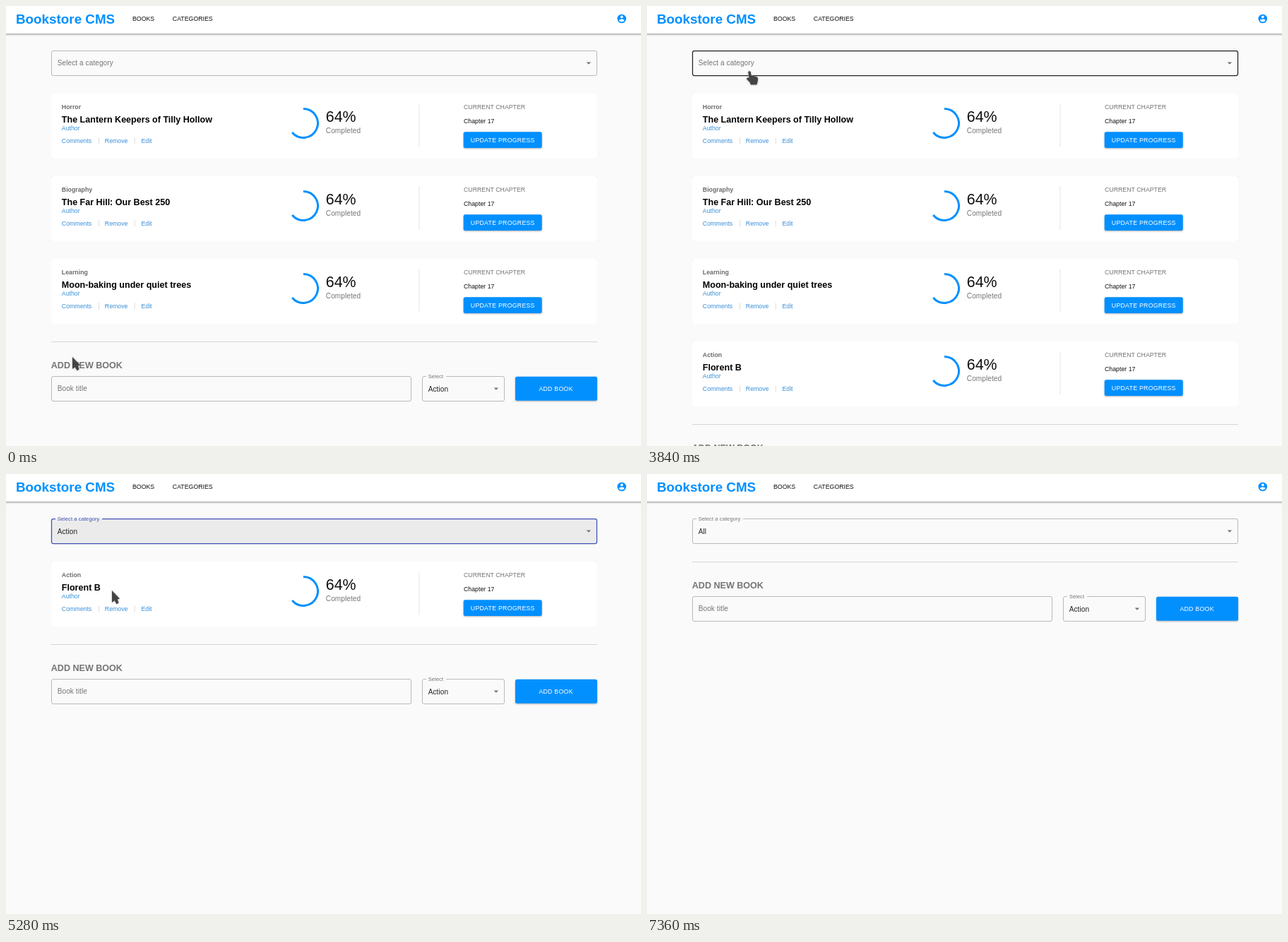
Recreate the animation shown at these times as an HTML page. Size 899 by 623 pixels, loop 7600 ms.

```html
<!DOCTYPE html>
<html lang="en">
<head>
<meta charset="utf-8">
<title>Bookstore</title>
<style>
html, body { margin: 0; width: 100%; height: 100%; overflow: hidden; background: #fafafa; }
svg { display: block; width: 899px; height: 623px; font-family: "Liberation Sans", Arial, sans-serif; }
.bar { filter: drop-shadow(0 1.2px 1.5px rgba(0,0,0,.45)); }
.card { filter: drop-shadow(0 .9px .7px rgba(0,0,0,.42)); }
.btn { filter: drop-shadow(0 1px .8px rgba(0,0,0,.3)); }
.menu { filter: drop-shadow(0 2px 2.5px rgba(0,0,0,.45)); }
.cur { filter: drop-shadow(0 .8px .8px rgba(0,0,0,.3)); }
</style>
</head>
<body>
<svg id="stage" viewBox="0 0 899 623" xmlns="http://www.w3.org/2000/svg"></svg>
<script>
const LOOP = 7600, STEP = 40;
const BLUE = '#0290ff', FOCUS = '#3f51b5', GREY = '#757575', INK = '#212121', LINK = '#3a8fd9';
const BODY = 10.05, SMALL = 8.79, TINY = 7.54, TITLE = 12.56;
const LEFT = 64.5, WIDTH = 772, TOP = 124, PITCH = 117, ROW = 22.6;

const BOOKS = [
  ['Horror', 'The Lantern Keepers of Tilly Hollow'],
  ['Biography', 'The Far Hill: Our Best 250'],
  ['Learning', 'Moon-baking under quiet trees'],
  ['Action', 'Florent B']
];
const CATEGORIES = ['All', 'Action', 'Biography', 'History', 'Horror', 'Kids', 'Learning', 'Sci-Fi'];
const KEY_TIMES = [520, 840, 880, 1080, 1080, 1240, 1320, 1400, 1600];

// time from which each list of books is shown
const LISTS = [
  [0, [0, 1, 2]], [2240, [0, 1, 2, 3]], [4840, [3]], [6080, [0, 1, 2, 3]],
  [6680, [1, 2, 3]], [6960, [2, 3]], [7080, [3]], [7320, []]
];
const MENUS = [
  { y: 65, open: 4060, shut: 4860, picked: -1, pressed: 1, press: 4640 },
  { y: 42.4, open: 5600, shut: 6080, picked: 1, pressed: 0, press: 5980 }
];
// time, x, y, pointer kind from then on
const POINTER = [
  [0, 94, 497, 'arrow'], [120, 150, 540, 'beam'], [200, 150, 540, 'beam'], [360, 608, 567, 'arrow'],
  [1800, 608, 567, 'arrow'], [1960, 735, 545, 'hand'], [2120, 780, 532, 'hand'], [2240, 780, 532, 'arrow'],
  [2440, 780, 532, 'arrow'], [2640, 722, 560, 'arrow'], [2880, 722, 560, 'arrow'], [3160, 420, 380, 'arrow'],
  [3320, 200, 140, 'arrow'], [3480, 164, 189, 'arrow'], [3640, 164, 189, 'arrow'], [3760, 149, 98, 'hand'],
  [3840, 145, 92, 'hand'], [4240, 145, 92, 'hand'], [4600, 108.5, 103, 'hand'], [4880, 108.5, 103, 'hand'],
  [5000, 116, 116, 'arrow'], [5160, 150, 165, 'arrow'], [5320, 150, 165, 'arrow'], [5480, 118, 92, 'hand'],
  [5640, 116.5, 92, 'hand'], [5760, 116.5, 107, 'hand'], [5920, 104, 60, 'hand'], [6080, 104, 60, 'arrow'],
  [6280, 152, 182, 'arrow'], [6440, 152, 182, 'arrow'], [6480, 162, 183, 'hand'], [7280, 162, 183, 'hand'],
  [7320, 190, 2, 'arrow'], [7360, 190, -40, 'arrow']
];

const clamp = v => Math.max(0, Math.min(1, v));
const ramp = (t, from, span) => { const p = clamp((t - from) / span); return p * p * (3 - 2 * p); };
const mix = (a, b, p) => a + (b - a) * p;

const text = (x, y, s, size, fill, extra = '') =>
  `<text x="${x}" y="${y}" font-size="${size}" fill="${fill}" ${extra}>${s}</text>`;
const body = (x, y, s, fill) => text(x, y, s, BODY, fill, 'letter-spacing=".094"');
const bold = (x, y, s, size, fill) => text(x, y, s, size, fill, 'font-weight="700"');
const rect = (x, y, w, h, fill, extra = '') =>
  `<rect x="${x}" y="${y}" width="${w}" height="${h}" fill="${fill}" ${extra}/>`;

function button(x, y, w, h, label, tx, ty) {
  return rect(x, y, w, h, BLUE, 'rx="2.5" class="btn"') +
    text(tx, ty, label, SMALL, '#fff', 'letter-spacing=".25"');
}

// rounded outline with a gap for the raised label
function outline(x, y, w, h, gap, color, weight, fill = 'none') {
  const r = 2.5, d = `M${x + 5.5 + gap} ${y}H${x + w - r}a${r} ${r} 0 0 1 ${r} ${r}V${y + h - r}` +
    `a${r} ${r} 0 0 1 ${-r} ${r}H${x + r}a${r} ${r} 0 0 1 ${-r} ${-r}V${y + r}a${r} ${r} 0 0 1 ${r} ${-r}H${x + 5.5}`;
  return (fill === 'none' ? '' : rect(x, y, w, h, fill, `rx="${r}"`)) +
    `<path d="${d}" fill="none" stroke="${color}" stroke-width="${weight}"/>`;
}

function field(o) {
  const p = o.raised, color = o.focus ? FOCUS : o.hover ? INK : '#b9b9b9';
  return outline(o.x, o.y, o.w, 35, o.gap * p, color, o.focus || o.hover ? 1.25 : 1, o.fill) +
    text(o.x + 8.2, mix(o.y + 20.7, o.y + 2.7, p), o.label, mix(BODY, TINY, p),
      o.focus ? FOCUS : GREY, 'letter-spacing=".09"') +
    (o.value ? body(o.x + 8.2, o.y + 21.3, o.value, INK) : '') +
    (o.arrow ? `<path d="M${o.x + o.w - 14.8} ${o.y + 16}h6.4l-3.2 3.3z" fill="${GREY}"/>` : '');
}

function header() {
  return rect(-5, -5, 909, 44, '#fff', 'class="bar"') +
    bold(14, 24.6, 'Bookstore CMS', 18.84, BLUE) +
    text(179, 21, 'BOOKS', SMALL, '#111') + text(235.8, 21, 'CATEGORIES', SMALL, '#111') +
    `<path transform="translate(864.2 10.4) scale(.628)" fill="${BLUE}" d="M12 2a10 10 0 1 0 0 20a10 10 0 1 0 0-20z` +
    `m0 3a3 3 0 1 1 0 6a3 3 0 1 1 0-6zm0 14.2c-2.5 0-4.7-1.3-6-3.2c0-2 4-3.1 6-3.1s6 1.1 6 3.1c-1.3 1.9-3.5 3.2-6 3.2z" fill-rule="evenodd"/>`;
}

function card([kind, title], i) {
  const a = 0.64 * 2 * Math.PI, r = 20.5;
  return `<g transform="translate(0 ${i * PITCH})">` +
    rect(64, 124, 773, 92, '#fff', 'rx="1.5" class="card"') +
    bold(78.8, 146.2, kind, SMALL, '#6b6b6b') +
    bold(78.8, 165, title, TITLE, '#000') +
    text(78.8, 175.6, 'Author', SMALL, LINK) +
    text(78.8, 194.3, 'Comments', SMALL, LINK) +
    text(139.8, 194.3, 'Remove', SMALL, LINK) +
    text(191.4, 194.3, 'Edit', SMALL, LINK) +
    rect(131, 186.5, 1, 9, '#dcdcdc') + rect(181.7, 186.5, 1, 9, '#dcdcdc') +
    `<path d="M421 ${166 - r}A${r} ${r} 0 1 1 ${421 + r * Math.sin(a)} ${166 - r * Math.cos(a)}" fill="none" stroke="${BLUE}" stroke-width="3"/>` +
    text(452.8, 163.7, '64%', 21.35, '#111') +
    body(452.8, 180.2, 'Completed', GREY) +
    rect(584.5, 138.5, 1, 61, '#e6e6e6') +
    text(648, 146.2, 'CURRENT CHAPTER', SMALL, GREY) +
    text(648, 166, 'Chapter 17', SMALL, '#111') +
    button(647.7, 178.2, 111, 22.8, 'UPDATE PROGRESS', 657.8, 192.6) + '</g>';
}

function form(t, count) {
  const y = TOP + count * PITCH, focus = t >= 160 && t < 2160;
  const typed = t < 2240 ? BOOKS[3][1].slice(0, KEY_TIMES.filter(k => k <= t).length) : '';
  return rect(64, y, 773, 1, '#d5d5d5') +
    bold(63.8, y + 37.6, 'ADD NEW BOOK', TITLE, GREY) +
    field({ x: LEFT, y: y + 49.5, w: 509, gap: 38, label: 'Book title', value: typed, focus,
      raised: t < 2240 ? ramp(t, 160, 120) : 0 }) +
    field({ x: 589.5, y: y + 49.5, w: 116, gap: 28, label: 'Select', value: 'Action', raised: 1, arrow: true }) +
    button(721, y + 49.7, 116, 34, 'ADD BOOK', 754.4, y + 69.6);
}

function category(t) {
  const focus = t >= 4040 && t < 6640;
  return field({ x: LEFT, y: 63.5, w: WIDTH, gap: 66, label: 'Select a category', arrow: true, focus,
    hover: t >= 3760 && t < 4040, fill: focus ? '#ebebeb' : 'none', raised: ramp(t, 4040, 160),
    value: t < 4840 ? '' : t < 6080 ? 'Action' : 'All' });
}

function menu(t, m, ptr) {
  if (t < m.open || t >= m.shut + 180) return '';
  const grow = ramp(t, m.open, 150), alpha = grow * (1 - ramp(t, m.shut, 180));
  const over = Math.floor((ptr.y - m.y - 5) / ROW), h = ROW * 8 + 10;
  const rowY = i => m.y + 5 + i * ROW;
  let s = rect(64, m.y, 773, h, '#fff', 'rx="2.5" class="menu"');
  CATEGORIES.forEach((name, i) => {
    const fill = i === m.picked ? '#ebebeb' : i === over ? '#f3f3f3' : '';
    if (fill) s += rect(64, rowY(i), 773, ROW, fill);
    if (i === m.pressed && t > m.press) {
      const r = 729 * ramp(t, m.press, 350);
      s += `<clipPath id="row"><rect x="64" y="${rowY(i)}" width="773" height="${ROW}"/></clipPath>` +
        `<circle cx="109" cy="${rowY(i) + 11}" r="${r}" fill="#000" fill-opacity=".19" clip-path="url(#row)"/>`;
    }
    s += body(74, rowY(i) + 15.1, name, INK);
  });
  return `<g opacity="${alpha}" transform="translate(450 81) scale(${mix(.75, 1, grow)} ${mix(.56, 1, grow)}) translate(-450 -81)">${s}</g>`;
}

function pointerAt(t) {
  let i = POINTER.length - 1;
  while (POINTER[i][0] > t) i--;
  const a = POINTER[i], b = POINTER[i + 1] || a;
  const p = b === a ? 0 : ramp(t, a[0], b[0] - a[0]);
  return { x: mix(a[1], b[1], p), y: mix(a[2], b[2], p), kind: a[3] };
}

const SHAPES = {
  arrow: 'M0 0V17L3.6 14.2L6.6 19.2L9.6 17.6L7.9 12.6L11 11.6Z',
  hand: 'M-1.8 1.4Q0 -1 1.8 1.4L2.8 6.6L9.6 8Q12.2 8.8 12.2 11.4L11.6 15.6L10.4 19.6H1.8L.8 16.6L-3.8 11.8Q-4.4 8.8 -.6 9.8Z',
  beam: 'M-3 -8H3V-6.8H.8V6.8H3V8H-3V6.8H-.8V-6.8H-3Z'
};

function pointer(p) {
  return `<path class="cur" transform="translate(${p.x} ${p.y})" d="${SHAPES[p.kind]}" fill="#444" ` +
    `stroke="#fff" stroke-width=".8" stroke-opacity=".7" paint-order="stroke"/>`;
}

function draw(t) {
  const list = LISTS.filter(l => l[0] <= t).pop()[1], ptr = pointerAt(t);
  return rect(0, 0, 899, 623, '#fafafa') + category(t) +
    list.map((b, i) => card(BOOKS[b], i)).join('') + form(t, list.length) + header() +
    MENUS.map(m => menu(t, m, ptr)).join('') + (t < 7360 ? pointer(ptr) : '');
}

const stage = document.getElementById('stage'), start = performance.now();
let shown = -1;
function tick() {
  const t = Math.floor((performance.now() - start) % LOOP / STEP) * STEP;
  if (t !== shown) stage.innerHTML = draw(shown = t);
  requestAnimationFrame(tick);
}
tick();
</script>
</body>
</html>
```
